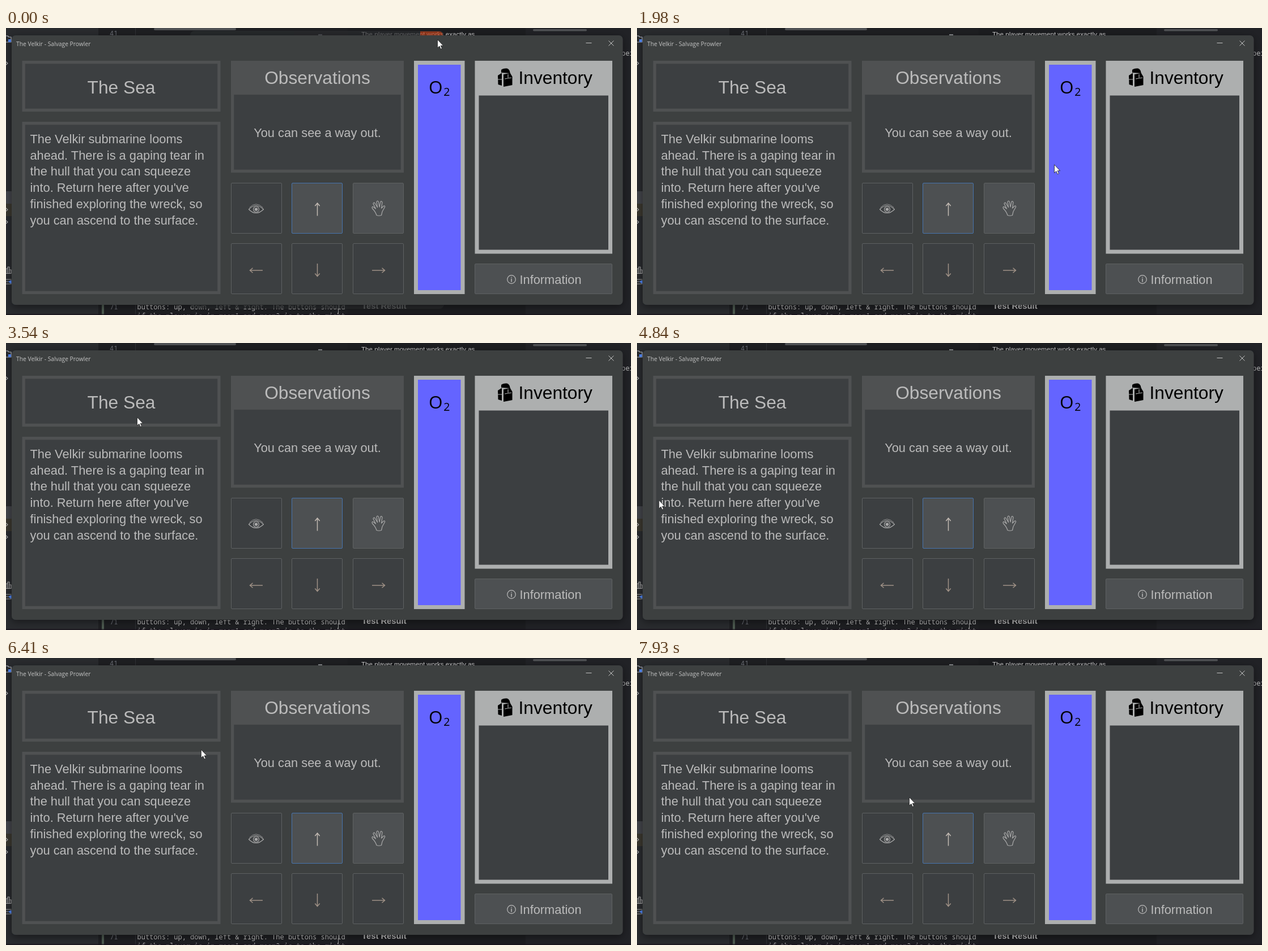
These frames come from a looping animation (1103 px wide and 508 px high, 8000 ms). An HTML page:

```html
<!DOCTYPE html>
<html lang="en">
<head>
<meta charset="utf-8">
<title>Sea exploration</title>
<style>
html, body { margin: 0; width: 100%; height: 100%; overflow: hidden; background: #1e1f22; }
svg { display: block; width: 1103px; height: 508px; }
text { font-family: "Liberation Sans", Arial, sans-serif; fill: #bbb; white-space: pre; }
.big { font-size: 31.7px; }
.mid { font-size: 21.8px; }
.mono { font: 12px "Noto Sans Mono", "DejaVu Sans Mono", monospace; }
.title { font: 10.3px "Open Sans", sans-serif; fill: #c4c4c4; }
.oxy { font-family: "Open Sans", sans-serif; fill: #000; }
.ink { fill: #000; }
.dim { fill: #6b6e75; }
.c { text-anchor: middle; }
.line { fill: none; stroke: #a8a8a8; stroke-width: 1.2; stroke-linecap: round; stroke-linejoin: round; }
.arrow { fill: none; stroke: #9f9186; stroke-width: 1.5; }
</style>
</head>
<body>
<svg viewBox="0 0 1103 508">
  <defs>
    <filter id="shade" x="-5%" y="-10%" width="110%" height="120%">
      <feDropShadow dx="0" dy="3" stdDeviation="7" flood-color="#000" flood-opacity=".45"/>
    </filter>
    <path id="arrow" d="M0 11.5V-10.5M-4.2 -6L0 -11L4.2 -6"/>
    <path id="chevron" d="M-1 -3.500L3 0L-1 3.500"/>
  </defs>

  <!-- editor behind the window -->
  <rect width="163" height="508" fill="#292b2e"/>
  <rect x="163" width="440" height="508" fill="#1e1f22"/>
  <rect x="603" width="314" height="508" fill="#1c1d20"/>
  <rect x="917" width="186" height="508" fill="#212226"/>
  <rect x="261" width="145" height="4" rx="2" fill="#505255"/>
  <rect x="930" y="2" width="95" height="3.5" rx="1.7" fill="#505255"/>
  <rect x="228" width="1" height="508" fill="#303236"/>
  <rect x="169" y="489" width="4" height="19" fill="#4d5a50"/>
  <rect x="551" y="11" width="7" height="2" fill="#8a8c90"/>
  <rect y="289" width="12" height="22" fill="#43454a"/>
  <rect y="311" width="12" height="22" fill="#3b382f"/>
  <g class="line">
    <path d="M-1 14H3L5 16H9V25H-1" stroke="#b4b8c0"/>
    <rect x="4" y="20" width="5" height="5" fill="#548af7" stroke="none"/>
    <use href="#chevron" y="62.500"/>
    <use href="#chevron" y="321.500"/>
    <use href="#chevron" y="343.500"/>
    <path d="M0 434V426H3V434M3 434V423H6V434M6 434V428H9V434M-1 434.500H9"/>
    <path d="M-1 445H9M-1 449H4M-1 453H9"/>
    <path d="M5 449L9 447V452Z" stroke="#548af7" fill="#548af7"/>
  </g>
  <text class="mono dim" x="183" y="13.500">41</text>
  <text class="mono dim" x="183" y="498">71</text>
  <text class="mono" x="231.500" y="498">buttons: up, down, left &amp; right. The buttons should</text>
  <text class="mono" x="231.500" y="514">if the player is in room1 and room2 is to the right</text>
  <text class="mono" x="1086" y="49">per</text>
  <path d="M586.500 489V506" stroke="#999"/>
  <text x="627" y="15" font-size="11.600" style="fill:#d4d4d4">The player movement works exactly as</text>
  <text x="628" y="496.500" font-size="14.800" font-weight="bold">Test Result</text>
  <rect y="506" width="1103" height="2" fill="#150e18" opacity=".6"/>
  <g id="dialog">
    <rect x="325" y="5" width="448" height="492" rx="8" fill="#2c2e31"/>
    <path d="M731 6H765Q771 7 771 13H731Z" fill="#d0451b"/>
  </g>

  <!-- game window -->
  <rect x="10" y="13" width="1078.500" height="477" rx="7" fill="#3c3f41" filter="url(#shade)"/>
  <text class="title" x="18" y="31.500">The Velkir - Salvage Prowler</text>
  <path d="M1023.500 26.500H1033.500M1063.500 22.500L1072.500 31.500M1072.500 22.500L1063.500 31.500" stroke="#c4c4c4" fill="none"/>
  <g id="panels"></g>

  <text class="big c" x="203.500" y="116">The Sea</text>
  <text class="big c" x="549.500" y="98.500">Observations</text>
  <text class="mid c" x="549.500" y="193">You can see a way out.</text>
  <g id="story"></g>
  <text class="oxy" x="746" y="115.500" font-size="31.500">O</text>
  <text class="oxy" x="772.300" y="119.500" font-size="19.500">2</text>
  <text class="big ink" x="904.500" y="98.500">Inventory</text>
  <text class="mid" x="906.500" y="453">Information</text>

  <!-- icons -->
  <g class="line">
    <path d="M428.500 321Q441 308 454.500 321Q441 334 428.500 321Z"/>
    <path d="M430 317.500Q441 306 453 317.500" stroke-width=".8"/>
    <circle cx="441.500" cy="321" r="5"/>
    <circle cx="441.500" cy="321" r="2.200" fill="#a8a8a8"/>
    <path d="M654 331.500Q652 325 646.500 319.500Q645 316 648 316.500L652.500 320L648 311Q648.500 308 651 310L655.500 317.500L654 307.500Q656 304.500 657.500 308L659 317L661 307.500Q663 305.500 664 308.500L662.500 319L666.500 315Q669 314 668.500 317L664 325L662.500 331.500Q658 333 654 331.500Z"/>
    <circle cx="892" cy="445" r="7.300" stroke="#bbb"/>
    <path d="M892 444V449M892 441.300V441.500" stroke="#bbb" stroke-width="1.500"/>
  </g>
  <g class="arrow">
    <use href="#arrow" transform="translate(549.500 321)" stroke="#c3bab3"/>
    <use href="#arrow" transform="translate(549.500 428.500) rotate(180)"/>
    <use href="#arrow" transform="translate(441.500 429) rotate(-90)"/>
    <use href="#arrow" transform="translate(657.500 429) rotate(90)"/>
  </g>
  <path d="M874 79V74Q877 71 884 71.500Q889 73 889.500 79L891 82L893.500 86V101L878 104V82L889 80Z"/>
  <path d="M868 84L875 79.500V102L868.500 100Z"/>
  <path d="M868 91H875M880 90L892 88M886 82V88" fill="none" stroke="#adafaf" stroke-width="1.200"/>

  <path id="pointer" d="M0 0V14.700L3.400 11.600L5.700 16.800L8 15.800L5.700 10.800H10.200Z" fill="#fff" stroke="#1c1c1c" stroke-width=".8"/>
</svg>
<script>
const $ = id => document.getElementById(id);
const NS = "http://www.w3.org/2000/svg";
function add(parent, tag, attrs, text = "") {
  const el = document.createElementNS(NS, tag);
  for (const k in attrs) el.setAttribute(k, attrs[k]);
  el.textContent = text;
  parent.append(el);
}

const DARK = "#3c3f41", EDGE = "#4f5152", LIGHT = "#adafaf", BTN = "#4d5052";
const box = (x, y, width, height, fill) => add($("panels"), "rect", { x, y, width, height, fill });

// box with a border b, a header of the same colour and an inner fill
function panel(x, y, w, h, edge, b, head = b, fill = DARK) {
  box(x, y, w, h, edge);
  box(x + b, y + head, w - 2 * b, h - head - b, fill);
}
function button(x, y, w, h, fill, stroke = "#5e6162") {
  add($("panels"), "rect", { x: x + .5, y: y + .5, width: w - 1, height: h - 1, rx: 1.5, fill, stroke });
}

panel(28.5, 58, 350, 90, EDGE, 5.3);
panel(28.5, 166, 350, 305, EDGE, 5.3);
panel(397, 58, 305, 198, EDGE, 5.3, 60);
panel(720, 58, 89.5, 413, LIGHT, 7, 7, "#6464ff");
panel(827.5, 58, 242.5, 341.5, LIGHT, 7, 61.5);
for (let i = 0; i < 6; i++) {
  const x = Math.floor(397 + (i % 3) * 107.6), y = i < 3 ? 274 : 381;
  button(x, y, 90, 90, i === 1 || i === 2 ? BTN : DARK, i === 1 ? "#4674ad" : undefined);
}
button(827, 417, 243, 54, BTN);

[
  "The Velkir submarine looms",
  "ahead. There is a gaping tear in",
  "the hull that you can squeeze",
  "into. Return here after you've",
  "finished exploring the wreck, so",
  "you can ascend to the surface."
].forEach((line, i) => add($("story"), "text", { class: "mid", x: 42.5, y: 204 + i * 28.7 }, line));

const LOOP = 8000, STEP = 70, TURN = 2 * Math.PI;

// eased move from a to b that sags downwards
function glide(start, end, [ax, ay], [bx, by], sag = 0) {
  return { start, end, at(u) {
    const k = u * u * (3 - 2 * u);
    return [ax + (bx - ax) * k, ay + (by - ay) * k + sag * 4 * k * (1 - k)];
  } };
}

// loop round a centre, in turns from the left side by way of the bottom
function orbit(start, end, [cx, cy], [rx, ry], from, to, lead = 0) {
  return { start, end, at(u) {
    const turn = from + (to - from) * u;
    return [cx - rx * Math.cos(TURN * turn), cy + ry * Math.sin(TURN * (turn + lead))];
  } };
}

const moves = [
  glide(60, 460, [761, 20], [758, 238]),
  glide(1980, 2540, [758, 238], [115, 123], 55),
  orbit(2940, 3680, [240, 137.5], [130, 6.5], -.075, 1),          // under the heading
  orbit(3750, 4300, [210, 141], [117, 4], 0, .66),
  orbit(4560, 5310, [203, 263], [166, 120], .58, 1.61),           // round the story
  orbit(5370, 6140, [197, 243], [131, 110], .56, 1.72),
  orbit(6210, 6970, [402, 139.5], [225, 45], -.047, .71, .21),    // over to the observations
  orbit(7040, 7790, [508, 140.5], [101, 46], .76, 2, .15),
  glide(7860, 7930, [407, 187], [480, 246])
];

function pointerAt(t) {
  const move = moves.findLast(m => t >= m.start);
  if (!move) return [761, 20];
  const { start, end, at } = move;
  if (t >= end) return at(1);
  const step = Math.floor((t - start + 10) / STEP) + 1;
  return at(Math.min(1, step * STEP / (end - start + STEP)));
}

function draw(t) {
  const [x, y] = pointerAt(t);
  $("pointer").setAttribute("transform", `translate(${x + .5} ${y + .5})`);
  const fade = t < 60 ? 0 : t / 180;
  $("dialog").setAttribute("opacity", Math.max(0, .65 * (1 - fade)));
}

function tick(now) {
  draw(now % LOOP);
  requestAnimationFrame(tick);
}
draw(0);
requestAnimationFrame(tick);
</script>
</body>
</html>
```
